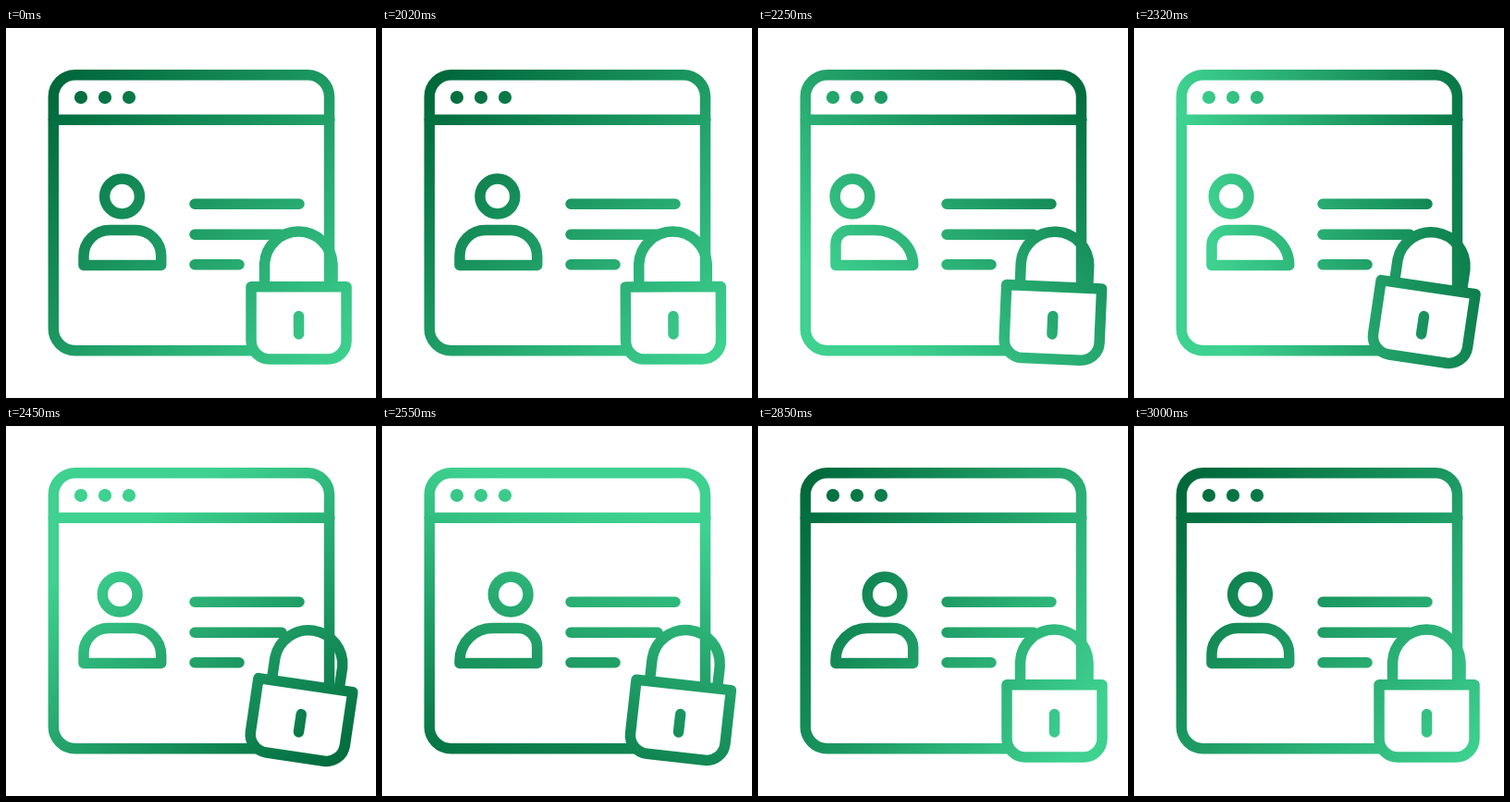
Animation, 400 px wide and 400 px high, one loop 4020 ms. Source, as an HTML page with a canvas:

```html
<!DOCTYPE html>
<html lang="en">
<head>
<meta charset="utf-8">
<title>Protected profile</title>
<style>
  html, body { margin: 0; width: 100%; height: 100%; overflow: hidden; background: #fff; }
  canvas { display: block; }
</style>
</head>
<body>
<canvas id="stage" width="400" height="400"></canvas>
<script>
const ctx = document.getElementById('stage').getContext('2d');
const LOOP = 4020, START = 2000, FIRST_MOVE = 2020, DURATION = 1000;
const { PI, sin, cos, min, max, sqrt } = Math;

const clamp = x => min(1, max(0, x));
const smooth = x => x * x * (3 - 2 * x);
const ramp = (p, from, to) => smooth(clamp((p - from) / (to - from)));

// Progress of the movement, 0 at rest before it and 1 at rest after it.
function progressAt(elapsed) {
  const time = elapsed % LOOP;
  return time < FIRST_MOVE ? 0 : clamp((time - START) / DURATION);
}

// The person looks left (-1), right (1) and back to the middle.
const lookAt = p => 2 * ramp(p, 0.255, 0.675) - ramp(p, 0, 0.21) - ramp(p, 0.7, 1);

// The lock shakes sideways, and tips left, right and back.
const shiftAt = p => -6 * sqrt(max(0, sin(PI * p))) * cos(2 * PI * (p - 0.02) / 0.335);
const tiltAt = p => 13.4 * ramp(p, 0.17, 0.32) - 5 * ramp(p, 0, 0.17) - 8.4 * ramp(p, 0.48, 0.7);

// The gradient makes one full turn; its light end draws closer midway.
function gradientAt(p) {
  const turn = p ** 0.82;
  const angle = 2 * PI * (0.625 + smooth(turn));
  const light = 215 - 90 * sin(PI * turn);
  const along = r => [212 + r * cos(angle), 212 + r * sin(angle)];
  const gradient = ctx.createLinearGradient(...along(215), ...along(-light));
  gradient.addColorStop(0, '#00693b');
  gradient.addColorStop(1, '#3ed190');
  return gradient;
}

const windowLines = new Path2D('M51 99.2H350 M204 190.3H317 M204 223.3H298 M204 255.8H252');
windowLines.roundRect(51.3, 50.8, 298.2, 298, 23.5);
const shackle = new Path2D('M279.5 280V255A36.8 36.8 0 0 1 353 255V280');
const lockBody = new Path2D('M265 279.7H368V338A20 20 0 0 1 348 358H285A20 20 0 0 1 265 338Z');
const keyhole = new Path2D('M316.5 311.5V331');

function addCircle(path, x, y, r) {
  path.moveTo(x + r, y);
  path.arc(x, y, r, 0, 2 * PI);
}

const dots = new Path2D();
for (let i = 0; i < 3; i++) addCircle(dots, 81 + 26 * i, 75, 7.1);

function personPath(look) {
  const corner = (r, x, y) => `A${r} ${min(r, 38)} 0 0 1 ${x} ${y}`;
  const left = 28 + 13 * look, right = 28 - 13 * look;
  const person = new Path2D(
    `M84 256.5V${218.5 + min(left, 38)}${corner(left, 84 + left, 218.5)}` +
    `H${167.7 - right}${corner(right, 167.7, 218.5 + min(right, 38))}V256.5Z`);
  addCircle(person, 125.5 + 23.5 * look, 182, 18.9);
  return person;
}

function draw(elapsed) {
  const p = progressAt(elapsed);
  const gradient = gradientAt(p);

  ctx.fillStyle = '#fff';
  ctx.fillRect(0, 0, 400, 400);
  ctx.strokeStyle = ctx.fillStyle = gradient;
  ctx.lineCap = ctx.lineJoin = 'round';
  ctx.lineWidth = 11.5;

  ctx.stroke(windowLines);
  ctx.fill(dots);
  ctx.stroke(personPath(lookAt(p)));

  // The paths are moved rather than the canvas, so the gradient stays fixed to the stage.
  const pose = new DOMMatrix()
    .translate(316.5 + shiftAt(p), 321).rotate(tiltAt(p)).translate(-316.5, -321);
  const posed = path => {
    const result = new Path2D();
    result.addPath(path, pose);
    return result;
  };
  const body = posed(lockBody);
  ctx.stroke(posed(shackle));
  ctx.fillStyle = '#fff';
  ctx.fill(body);
  ctx.stroke(body);
  ctx.stroke(posed(keyhole));
}

const startTime = performance.now();
function tick() {
  draw(performance.now() - startTime);
  requestAnimationFrame(tick);
}
tick();
</script>
</body>
</html>
```
